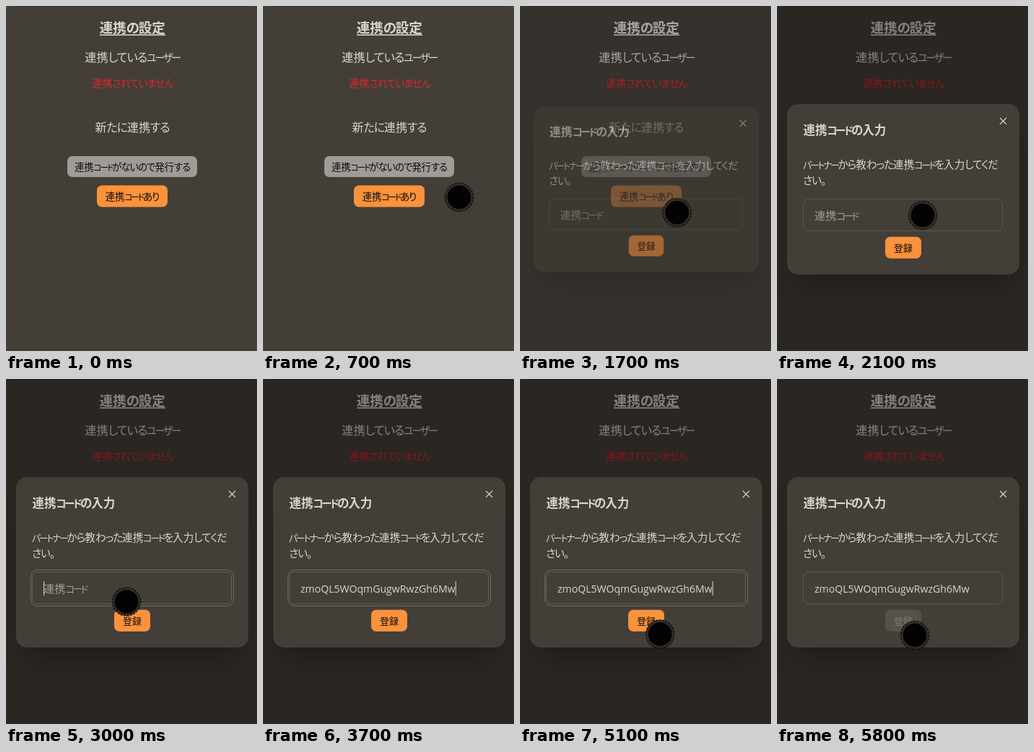
Recreate the animation shown at these times as an HTML page. Size 348 px wide and 478 px high, loop 5900 ms.

```html
<!DOCTYPE html>
<html lang="ja">
<head>
<meta charset="utf-8">
<title>連携の設定</title>
<style>
  html, body { margin: 0; width: 100%; height: 100%; overflow: hidden; background: #433f38; }
  svg { display: block; width: 348px; height: 478px; }
  text {
    font-family: "Noto Sans CJK JP", "Noto Sans CJK", sans-serif;
    font-feature-settings: "palt";
    fill: #d9d6d2;
  }
  .hira { letter-spacing: -.07em; }
  .kata { font-size: .89em; letter-spacing: -.18em; }
  .mid { text-anchor: middle; }
  .medium { font-weight: 500; }
  .bold { font-weight: 700; }
  .red { fill: #dc2532; }
  .dark { fill: #0c0a09; }
  .hint { fill: #a19d98; }
  #code { font-family: "Open Sans", "Noto Sans", sans-serif; font-size: 14.1px; font-feature-settings: normal; }
  #shadow { filter: blur(17px); }
</style>
</head>
<body>
<svg viewBox="0 0 348 478">
  <rect width="348" height="478" fill="#433f38"/>
  <rect x="11" width="329" height="1" fill="#312d29"/>
  <text class="mid bold" x="175.2" y="37" font-size="18.5">連携の設定</text>
  <rect x="130" y="39.3" width="91" height="1.6" fill="#d9d6d2"/>
  <text class="mid" x="175" y="77" font-size="16.2">連携しているユーザー</text>
  <text class="mid red" x="175.5" y="112" font-size="14">連携されていません</text>
  <text class="mid" x="175" y="173.5" font-size="16">新たに連携する</text>
  <rect x="85" y="208" width="180" height="29" rx="7" fill="#a09b96"/>
  <text class="mid dark" x="175" y="228" font-size="13.3">連携コードがないので発行する</text>
  <rect x="126" y="248.5" width="98" height="30" rx="7" fill="#fb923c"/>
  <text class="mid dark" x="175" y="269" font-size="13.3">連携コードあり</text>

  <rect id="shade" width="348" height="478" fill="#060102"/>
  <g id="modal">
    <rect id="shadow" x="26" y="173" width="298" height="212" rx="14" fill-opacity=".25"/>
    <rect x="14" y="136" width="322" height="236" rx="15" fill="#433f38"/>
    <path d="M309 155l9 9m0-9l-9 9" stroke="#d9d6d2" stroke-width="1.1"/>
    <text class="bold" x="36.5" y="178" font-size="16.5">連携コードの入力</text>
    <text class="medium" x="36" y="225" font-size="14.6">パートナーから教わった連携コードを入力してくだ</text>
    <text class="medium" x="36" y="247" font-size="14.6">さい。</text>
    <rect id="ring" x="34.5" y="264.5" width="281" height="50" rx="9" fill="none" stroke="#6f6b64"/>
    <rect id="field" x="36.5" y="267.5" width="276" height="44" rx="7" fill="none"/>
    <text id="hint" class="hint" x="52" y="296" font-size="15.2">連携コード</text>
    <text id="code" class="medium" x="52" y="296">zmoQL5WOqmGugwRwzGh6Mw</text>
    <rect id="caret" y="280" width="1" height="20" fill="#d9d6d2"/>
    <rect id="send" x="150" y="319.7" width="50" height="30" rx="7"/>
    <text id="label" class="mid medium" x="175" y="340" font-size="13">登録</text>
  </g>
  <g id="cursor">
    <circle r="19.6" fill="#2f2c29" stroke="#0d0c0b" stroke-width="1.3" stroke-dasharray="3 1.5"/>
    <circle r="16.3" fill="#040303"/>
  </g>
</svg>
<script>
const LOOP = 5900, STEP = 100;
const OPEN = 1600, FOCUS = 2700, HIDE = 3500, PASTE = 3700, SHOW = 4600, SUBMIT = 5400;

// time, x, y
const path = [
  [400, 330, 295], [500, 311, 286], [700, 272, 265], [900, 237, 281],
  [1000, 229, 285], [1200, 223, 285], [1600, 223, 285], [2000, 202, 290],
  [2200, 202, 290], [2600, 170, 306], [2800, 167, 308.5], [HIDE, 167, 308.5],
  [SHOW, 172, 318], [4800, 204, 349], [5200, 191, 355], [LOOP, 191, 355]
];

const $ = id => document.getElementById(id);
const clamp = v => Math.max(0, Math.min(1, v));
const easeOut = v => 1 - (1 - clamp(v)) ** 2;
const within = (t, a, b) => t >= a && t < b;
const show = (id, on) => $(id).setAttribute("visibility", on ? "inherit" : "hidden");
const mix = (a, b, p) => `rgb(${a.map((v, i) => Math.round(v + (b[i] - v) * p))})`;

// Kana are set smaller and tighter than kanji.
for (const el of document.querySelectorAll("text")) {
  el.innerHTML = el.textContent
    .replace(/[ぁ-ん]+/g, s => `<tspan class="hira">${s}</tspan>`)
    .replace(/[ァ-ヶー]+/g, s => `<tspan class="kata">${s}</tspan>`);
}

function pointer(t) {
  const i = Math.max(1, path.findIndex(p => p[0] > t));
  const [t0, x0, y0] = path[i - 1], [t1, x1, y1] = path[i];
  const p = clamp((t - t0) / (t1 - t0));
  return [x0 + (x1 - x0) * p, y0 + (y1 - y0) * p];
}

function draw(t) {
  const open = easeOut((t - OPEN) / 300);
  const scale = .93 + .07 * open;
  $("shade").setAttribute("opacity", .4 * open);
  $("modal").setAttribute("opacity", open);
  $("modal").setAttribute("transform", `translate(175 254) scale(${scale}) translate(-175 -254)`);

  const focused = within(t, FOCUS, SUBMIT), pasted = t >= PASTE;
  show("ring", focused);
  $("field").setAttribute("stroke", focused ? "#66625b" : "#5c5851");
  show("hint", !pasted);
  show("code", pasted);

  const since = t - (pasted ? PASTE : FOCUS);
  show("caret", focused && since % 1100 < 600);
  $("caret").setAttribute("x", pasted ? 52 + $("code").getComputedTextLength() : 52);

  const off = easeOut((t - SUBMIT + STEP) / 300);
  $("send").setAttribute("fill", mix([251, 146, 60], [86, 82, 75], off));
  $("label").style.fill = mix([12, 10, 9], [128, 124, 117], off);

  const [x, y] = pointer(t);
  show("cursor", within(t, path[0][0], HIDE) || t >= SHOW);
  $("cursor").setAttribute("transform", `translate(${x} ${y})`);
}

const start = performance.now();
function tick() {
  const t = (performance.now() - start) % LOOP;
  draw(Math.floor(t / STEP) * STEP);
  requestAnimationFrame(tick);
}
tick();
</script>
</body>
</html>
```
